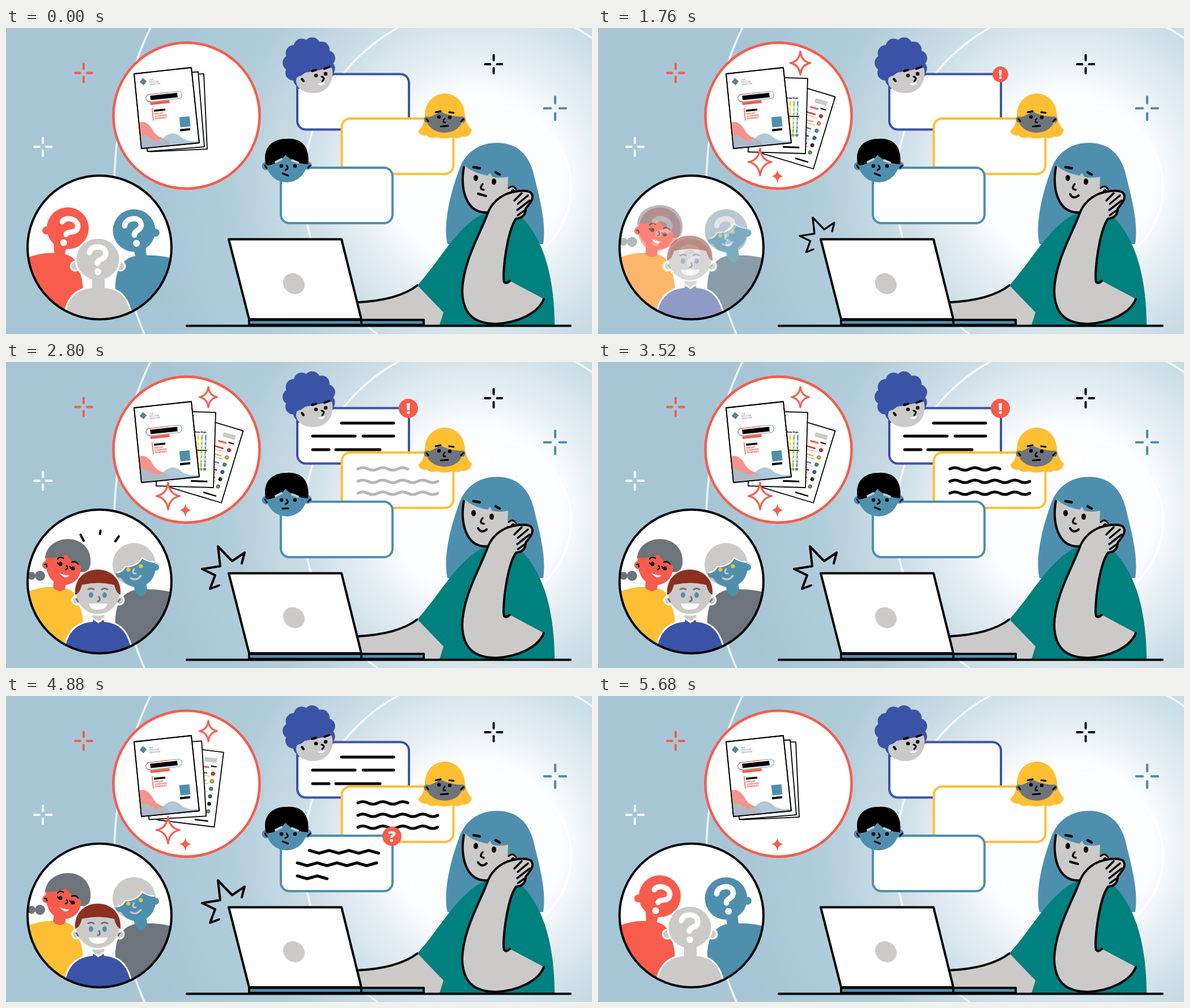
These frames come from a looping animation (1034 by 541 pixels, 5.76 s). An HTML page:

```html
<!DOCTYPE html>
<html lang="en">
<head>
<meta charset="utf-8">
<title>Documents and questions</title>
<style>
html, body { margin: 0; width: 100%; height: 100%; overflow: hidden; }
svg { display: block; width: 100vw; height: 100vh; --red: #f75c4c; --sea: #4f8fae; --navy: #3b53a6; --sun: #ffbf34; --skin: #cbcac9; --slate: #6d747c; }
.line { fill: none; stroke: #000; stroke-width: 4; stroke-linecap: round; stroke-linejoin: round; }
.thin { stroke-width: 3; }
.edge { stroke: #fff; stroke-width: 3; stroke-linejoin: round; }
.paper { fill: #fff; stroke: #000; stroke-width: 1.8; stroke-linejoin: round; }
.bubble { fill: #fff; stroke-width: 4; }
.red { fill: var(--red); } .sea { fill: var(--sea); } .navy { fill: var(--navy); }
.sun { fill: var(--sun); } .skin { fill: var(--skin); } .slate { fill: var(--slate); }
.outline { fill: #fff; stroke: var(--red); stroke-linejoin: round; }
.text { stroke-width: 5; }
.badge text { font: 800 27px "Open Sans", sans-serif; fill: #fff; text-anchor: middle; }
.tiny { font: 4px Inter, sans-serif; fill: #777; }
.tinyRed { font: 800 4px Inter, sans-serif; fill: var(--red); }
</style>
</head>
<body>
<svg viewBox="0 0 1034 541" preserveAspectRatio="none">
<defs>
  <radialGradient id="sky" gradientUnits="userSpaceOnUse" cx="830" cy="265" r="600">
    <stop offset="0" stop-color="#fff"/><stop offset=".25" stop-color="#fcfdfe"/>
    <stop offset=".36" stop-color="#e6eff3"/><stop offset=".49" stop-color="#cfe0e8"/>
    <stop offset=".72" stop-color="#b2cdda"/><stop offset="1" stop-color="#a6c6d6"/>
  </radialGradient>
  <clipPath id="crowdClip"><circle cx="165" cy="388" r="127"/></clipPath>
  <clipPath id="coverClip"><path d="M226,81L327,70 341,203 239,213Z"/></clipPath>
  <path id="plus" d="M0,-16V-7M0,7V16M-15,0H-6M6,0H15"/>
  <path id="star" d="M0,-18Q2,-2.5 15.5,0Q2,2.5 0,18Q-2,2.5 -15.5,0Q-2,-2.5 0,-18Z"/>
  <g id="query">
    <path d="M-15,-10C-13,-23 14,-24 14,-8C14,3 -1,1 -1,9" fill="none" stroke="#fff" stroke-width="9.5" stroke-linecap="round"/>
    <circle cy="24" r="6" fill="#fff"/>
  </g>
  <path id="bodyLeft" d="M30,410Q58,396 85,398L84,380H108L104,400Q120,403 126,420Q137,445 136,470L100,520H30Z"/>
  <path id="bodyRight" d="M193,470C191,430 203,408 228,403L224,385H246L248,402Q272,401 296,408V520H222Z"/>
  <path id="bodyFront" d="M101,520C104,478 122,461 152,458V440H174V458C203,461 219,478 224,520Z"/>
</defs>

<rect width="1034" height="541" fill="url(#sky)"/>
<g fill="none" stroke="#fff" stroke-width="3.5" opacity=".8">
  <circle cx="848" cy="282" r="657"/><circle cx="848" cy="282" r="323"/><circle cx="852" cy="282" r="145"/>
</g>
<g fill="none" stroke-width="4" stroke-linecap="round">
  <use href="#plus" x="137" y="79.5" stroke="#f75c4c"/>
  <use href="#plus" x="65" y="210" stroke="#fff"/>
  <use href="#plus" x="860.5" y="64" stroke="#000"/>
  <use href="#plus" transform="translate(969 142) scale(1.28)" stroke="#4f8fae" stroke-width="3.3"/>
</g>

<!-- documents -->
<circle cx="318.5" cy="155" r="129" fill="#fff" stroke="#f75c4c" stroke-width="4.5"/>
<g id="page3">
  <rect class="paper" x="-101" y="-133" width="101" height="133"/>
  <rect x="-32" y="-121" width="22" height="8" fill="#c9c9c9"/>
  <rect x="-37" y="-105" width="15" height="3" class="red"/><rect x="-19" y="-107" width="10" height="2"/>
  <g id="rows"></g>
  <rect x="-36" y="-10" width="24" height="2.5"/>
</g>
<g id="page2">
  <rect class="paper" x="-101" y="-133" width="101" height="133"/>
  <text class="tiny" x="-47" y="-96" style="font-weight:800;fill:#000">Good Data Stats</text>
  <g id="columns"></g>
  <path d="M-60,-65H-14" class="line" style="stroke-width:1.5"/>
  <rect x="-40" y="-12" width="29" height="3"/>
</g>
<path class="paper" d="M226,81L327,70 341,203 239,213Z"/>
<g clip-path="url(#coverClip)">
  <path d="M230,169Q246,160 257,177Q263,189 272,193Q286,197 293,210L235,218Z" fill="#f7938a"/>
  <path d="M230,194Q244,184 256,195Q268,203 278,194Q294,179 309,193Q322,204 345,198V215H235Z" fill="#a3bfd0" opacity=".85"/>
</g>
<path class="paper" d="M226,81L327,70 341,203 239,213Z" style="fill:none"/>
<g transform="translate(226 81) rotate(-6.2)">
  <rect x="10" y="11" width="9" height="9" fill="#597f9b" transform="rotate(45 14.5 15.5)"/>
  <text class="tiny" y="15"><tspan x="25">THE</tspan><tspan x="25" dy="4.2">ROUTINE</tspan><tspan x="25" dy="4.2">REGISTER</tspan></text>
  <rect x="16" y="39" width="64" height="13" rx="6.5" fill="#fff" stroke="#6f9db2"/>
  <path d="M58,39H23a6.5,6.5 0 0 0 0,13" fill="none" stroke="#f75c4c"/>
  <rect x="24" y="41.5" width="48" height="8"/>
  <rect x="23" y="53" width="34" height="5" class="red"/>
  <path d="M25,64V86" stroke="#f75c4c" stroke-width="1.5"/>
  <rect x="28" y="67" width="20" height="3.5"/>
  <text class="tinyRed" y="76"><tspan x="28">REPORT</tspan><tspan x="28" dy="4.2">OVERVIEW</tspan><tspan x="28" dy="4.2">SUMMARY</tspan></text>
  <rect x="71" y="85" width="18" height="18" class="sea"/>
  <rect x="70" y="106" width="18" height="4"/>
</g>
<g transform="translate(357 62)"><g id="star1"><use href="#star" class="outline" stroke-width="3"/></g></g>
<g transform="translate(286 237)"><g id="star2"><use href="#star" class="outline" transform="scale(1.32)" stroke-width="2.4"/></g></g>
<g transform="translate(316.5 262)"><g id="star3"><use href="#star" class="red" transform="scale(.66)"/></g></g>

<!-- crowd -->
<circle cx="165" cy="388" r="127" fill="#fff"/>
<g clip-path="url(#crowdClip)">
  <g id="unknown">
    <g class="red"><use href="#bodyLeft"/><circle cx="109" cy="354" r="37"/><circle cx="71" cy="358" r="7"/></g>
    <g class="sea"><use href="#bodyRight"/><circle cx="226" cy="358" r="37.5"/><circle cx="264" cy="362" r="7"/></g>
    <use href="#query" transform="translate(110 357) rotate(20)"/>
    <use href="#query" transform="translate(226 357) rotate(-10)"/>
    <g class="skin edge">
      <use href="#bodyFront"/><circle cx="122" cy="421" r="8"/><circle cx="202" cy="421" r="8"/>
      <ellipse cx="162" cy="409" rx="39" ry="38"/>
    </g>
    <path d="M152,438H174V460H152Z" class="skin"/>
    <use href="#query" transform="translate(162 407)"/>
  </g>
  <g id="known">
    <g class="slate"><circle cx="45" cy="378" r="7"/><circle cx="60" cy="378" r="9"/></g>
    <use href="#bodyLeft" class="sun"/>
    <path class="red" d="M85,380H108L104,402Q94,409 83,399Z"/>
    <path class="slate" d="M69,347C70,325 90,313 109,313C135,313 152,332 149,358C147,372 135,373 128,370Z"/>
    <path class="red" d="M70,346Q95,347 106,340Q114,353 132,361C134,380 120,395 101,394C80,394 68,372 70,346Z"/>
    <circle cx="71" cy="359" r="7" class="red"/>
    <path class="line" style="stroke-width:2.5" d="M68,358Q72,356 72,362M91,348Q96,343 101,347M116,354Q123,351 127,357M91,355L95,359M113,362L117,367M107,360Q111,366 105,367"/>
    <circle cx="96" cy="357" r="3.5"/><circle cx="118" cy="365" r="3.5"/>
    <path d="M94,373Q104,378 112,377Q105,386 94,373Z" fill="#fff"/>

    <use href="#bodyRight" class="slate"/>
    <path d="M224,385H247L249,403Q240,425 227,404Z" class="sea"/>
    <circle cx="226" cy="358" r="38" class="skin"/>
    <path class="sea" d="M193,374Q205,374 210,362Q232,362 240,346Q252,350 263,354C268,380 250,398 232,398C214,398 207,387 203,382Q196,383 193,374Z"/>
    <path class="line" style="stroke:#fff;stroke-width:2.5" d="M197,372Q206,371 210,362Q232,362 240,346Q248,352 261,354"/>
    <circle cx="264" cy="363" r="6" class="sea"/>
    <circle cx="216" cy="367" r="3.5" class="sun"/><circle cx="238" cy="361" r="3.5" class="sun"/>
    <path class="line thin" style="stroke:#cbcac9" d="M226,366Q221,374 229,374M220,382Q230,388 238,378"/>

    <g class="edge">
      <use href="#bodyFront" class="navy"/>
      <path class="skin" d="M151,440H175V452L163,460 151,452Z"/>
      <circle cx="125" cy="421" r="8" class="skin"/><circle cx="200" cy="421" r="8" class="skin"/>
      <ellipse cx="162" cy="407" rx="40" ry="40" class="skin"/>
    </g>
    <path d="M122,412C117,352 207,352 202,412Q194,408 191,394Q162,387 134,394Q131,408 122,412Z" fill="#8c3021"/>
    <g class="sea"><ellipse cx="150" cy="412" rx="4" ry="5"/><ellipse cx="174" cy="412" rx="4" ry="5"/></g>
    <path class="line thin" style="stroke:#6d747c" d="M145,402Q150,399 155,402M169,402Q174,399 179,402M164,415Q168,422 162,423M124,419L127,424M201,419L198,424"/>
    <path d="M146,427H179Q177,438 162,438Q148,438 146,427Z" fill="#fff"/>
  </g>
</g>
<circle cx="165" cy="388" r="127" class="line"/>
<g id="rays" class="line">
  <path pathLength="1" d="M137,316L121,284"/><path pathLength="1" d="M166,304L168,286"/><path pathLength="1" d="M193,317L211,291"/>
</g>

<!-- messages -->
<rect class="bubble" x="514" y="81.5" width="197" height="98" rx="15" stroke="#3b53a6"/>
<path id="text1" class="line text" d="M592,108H684M541,131H616M630,131H684M541,155H570M582,155H660"/>
<rect class="bubble" x="592.5" y="160" width="197" height="98" rx="15" stroke="#ffbf34"/>
<path id="text2" class="line text"/>
<rect class="bubble" x="485" y="247" width="197" height="98" rx="15" stroke="#4f8fae"/>
<path id="text3" class="line text"/>

<g class="navy"><g id="curls"></g><circle cx="536" cy="60" r="35"/><path d="M500,70L515,108 545,100 578,84 574,60Z"/></g>
<path class="skin" d="M528,79Q550,75 575,70C581,95 566,115 543,115C525,115 511,106 512,92Q520,84 528,79Z"/>
<circle cx="519" cy="92" r="7" class="skin"/>
<g class="line"><path d="M522,90L525,94M540,76L547,74M562,72L570,69"/><path class="thin" d="M557,86Q564,88 558,94"/></g>
<circle cx="547" cy="84" r="3.3"/><circle cx="564" cy="81" r="3.3"/>
<path d="M549,98Q556,99 563,95Q560,105 549,98Z" fill="#fff"/>

<path class="sun" d="M739,155C740,103 808,103 810,155C812,168 817,175 822,180Q819,194 805,192Q796,197 788,193Q774,198 760,193Q750,197 742,190Q732,192 727,182C736,175 738,165 739,155Z"/>
<path class="slate" d="M741,159Q757,155 766,147Q780,156 806,157C806,174 792,185 774,185C756,185 742,174 741,159Z"/>
<g class="slate"><circle cx="743" cy="162" r="5.5"/><circle cx="805" cy="162" r="5.5"/></g>
<g class="line thin"><path d="M758,149L767,147M782,149L790,150M742,161L745,165M807,161L803,165M774,160Q769,167 775,167M767,174L780,173"/></g>
<circle cx="764" cy="157" r="3.2"/><circle cx="783" cy="158" r="3.2"/>

<g class="sea"><circle cx="495" cy="237" r="36"/><circle cx="459" cy="244" r="7.5"/><circle cx="532" cy="243" r="7.5"/></g>
<path d="M458,240C452,208 474,195 496,196C520,194 537,209 533,241Q508,240 493,224Q483,240 461,243Z"/>
<path class="line" d="M476,237L486,232M505,234L515,238" style="stroke:#cbcac9"/>
<circle cx="486" cy="244" r="3.3"/><circle cx="510" cy="244" r="3.3"/>
<path class="line thin" d="M457,243L460,248M537,243L533,247M495,243Q500,249 493,251"/>
<g transform="translate(493 259)"><path id="boyMouth" class="line thin" d="M-5,-2L5,2"/></g>

<g class="badge">
  <g transform="translate(710 82)"><g id="alert"><circle r="17" class="red"/><text y="10">!</text></g></g>
  <g transform="translate(681 248)"><g id="ask"><circle r="17" class="red"/><text y="10">?</text></g></g>
</g>

<!-- woman -->
<path class="sea" d="M779,382C771,350 783,295 798,255C808,220 835,203 866,203C905,203 925,228 932,262C944,310 953,345 948,382Z"/>
<path class="skin" d="M620,485C660,483 700,475 726,455L775,503 765,524H737V515H627Z"/>
<path class="line" d="M620,485C660,483 700,475 726,455"/>
<path fill="#00807f" d="M848,326C800,345 770,405 726,455L772,503 765,525H968C968,450 952,372 905,330Z"/>
<path class="skin" d="M809,243C800,275 806,326 848,326C870,322 882,308 885,290L886,263Q870,266 858,263L854,256 850,261Q825,257 809,243Z"/>
<path class="line" d="M808,246C801,280 810,328 849,326"/>
<circle cx="893" cy="287" r="8" class="skin"/><path class="line thin" d="M887,283Q894,276 900,285M892,290Q893,285 897,288"/>
<path class="line" style="fill:var(--skin)" d="M949,479C940,503 905,521 865,523C825,523 806,505 805,465C806,415 836,365 849,330C856,310 870,299 884,293C900,288 915,286 925,290C932,296 930,305 917,319C917,329 912,336 900,337C884,360 875,435 879,449Q883,453 889,447"/>
<path class="line" style="stroke-width:3.5" d="M897,305L910,292M903,311L921,296M902,322L924,305M903,331L916,322"/>
<path id="brows" class="line" style="stroke-width:4.5" d="M825,246L836,248M864,255L871,259"/>
<g id="gaze">
  <g transform="translate(829 265)"><ellipse class="lid" rx="4" ry="5.5"/></g>
  <g transform="translate(861 271.5)"><ellipse class="lid" rx="4" ry="5.5"/></g>
</g>
<path class="line" style="stroke-width:3.5" d="M841,276Q834,285 843,286"/>
<path id="flat" class="line" d="M833,293L847,297"/>
<path id="smile" class="line" d="M833,294Q839,304 848,296"/>

<!-- laptop -->
<g transform="translate(400 375)"><g id="burst"><path class="line" transform="translate(-400 -375)" d="M416,356L421,337 399,352 374,326 378,361 346,366 369,377 360,401 376,395"/></g></g>
<path class="line" style="fill:var(--sea)" d="M429,516H737V525H429ZM627,516V525"/>
<path class="line" style="fill:#fff" d="M393,373.5H592L627,515H429Z"/>
<ellipse cx="508" cy="452" rx="20" ry="17.5" transform="rotate(40 508 452)" class="skin"/>
<path class="line" d="M319,526.5H996"/>
</svg>

<script>
const LOOP = 5760, STEP = 80;
const $ = id => document.getElementById(id);
const repeat = (n, draw) => Array.from({ length: n }, (_, i) => draw(i)).join('');

// repeated details
const squiggle = (x, y, n) => `M${x},${y}q8.8,-4.5 17.6,0` + 't17.6,0'.repeat(n - 1);
const zigzag = (x, y, n) => `M${x},${y}` + repeat(n, i => `l17.5,${i % 2 ? -5 : 5}`);
$('text2').setAttribute('d', squiggle(621, 189, 5) + squiggle(621, 211, 8) + squiggle(621, 232, 8));
$('text3').setAttribute('d', zigzag(535, 273, 7) + zigzag(514, 295, 8) + zigzag(514, 318, 3));
$('curls').innerHTML = repeat(11, i => {
  const a = i * Math.PI * 2 / 11 + .3;
  return `<circle cx="${535 + 33 * Math.cos(a)}" cy="${62 + 32 * Math.sin(a)}" r="14"/>`;
});
const inks = ['#c8382c', '#f0a92c', '#3b8aa8', '#3b53a6', '#222', '#5a9a55'];
$('rows').innerHTML = repeat(inks.length, i => `<g transform="translate(0 ${13.4 * i - 93})">
  <path d="M-44,0H-24" stroke="${inks[i]}" stroke-width="2.5"/><path d="M-40,5H-20" stroke="#aaa"/>
  <circle cx="-14" r="3.2" fill="${inks[i]}" stroke="#333" stroke-width=".7"/></g>`);
const bars = ['#c9c9c9', '#f2c230', '#9db83c', '#4f8fae'];
$('columns').innerHTML = repeat(bars.length, i => `<g transform="translate(${6.6 * i - 36} 0)">
  <path d="M0,-92V-36" stroke="${bars[i]}" stroke-width="2.5"/>
  <path d="M0,-84V-42" stroke="#fff" stroke-width="1.2" stroke-dasharray="5 3"/><circle cy="-32" r="2.8" fill="${bars[i]}"/></g>`);

// motion rules
const clamp = v => Math.min(1, Math.max(0, v));
const mix = (a, b, k) => a + (b - a) * k;
const overshoot = p => 1 + 2.7 * (p - 1) ** 3 + 1.7 * (p - 1) ** 2;
const setScale = (id, s) => $(id).setAttribute('transform', `scale(${Math.max(0, s)})`);
const placePage = (id, from, to, k) => {
  const [x, y, angle] = from.map((v, i) => mix(v, to[i], k));
  $(id).setAttribute('transform', `translate(${x} ${y}) rotate(${angle})`);
};

function draw(t) {
  const ramp = (start, length) => clamp((t - start) / length);
  const between = (start, end, rise, fall = rise) => ramp(start, rise) - ramp(end, fall);
  const pop = (start, end) => overshoot(ramp(start, 320)) * (1 - ramp(end, 240));
  const pulse = (...peaks) => 1 + .2 * Math.max(...peaks.map(p => 1 - Math.abs(t - p) / 240), 0);
  const fade = (id, amount) => $(id).setAttribute('opacity', amount);

  placePage('page2', [350, 210, -4.7], [366, 222, 1.7], between(480, 4560, 560, 400));
  placePage('page3', [355, 214, -2.6], [380, 249, 16.8], between(800, 4640, 640, 480));
  setScale('star1', pop(640, 5040) * pulse(1840, 3200, 3760));
  setScale('star2', pop(1120, 5440));
  setScale('star3', pop(1120, 5680));

  const reveal = between(1600, 5200, 320);
  fade('known', reveal);
  fade('unknown', 1 - reveal);
  // each ray shoots outward, then its tail catches up
  const since = t - [2000, 2720, 4000].findLast(start => start <= t);
  const head = clamp(since / 240), tail = clamp((since - 160) / 100);
  $('rays').setAttribute('stroke-dasharray', `${head - tail} 3`);
  $('rays').setAttribute('stroke-dashoffset', -tail);
  fade('rays', head > tail ? 1 : 0);

  fade('text1', between(2080, 5040, 480, 240));
  fade('text2', between(2640, 5040, 560, 240));
  fade('text3', between(4080, 5040, 360, 240));
  setScale('alert', pop(1680, 4640));
  setScale('ask', pop(3600, 4960));
  setScale('burst', pop(1680, 5040) * pulse(3200, 3840, 4480));
  $('boyMouth').setAttribute('transform', `rotate(${-24 * between(2560, 2960, STEP)})`);

  const happy = t >= 800 && t < 5520;
  fade('smile', happy ? 1 : 0);
  fade('flat', happy ? 0 : 1);
  const look = between(1760, 3520, 240), down = between(2400, 3520, 240);
  $('gaze').setAttribute('transform', `translate(${-3 * look - down} ${2 * down})`);
  const blink = (t + 640) % 1920 < 2 * STEP;
  document.querySelectorAll('.lid').forEach(lid => lid.setAttribute('transform', `scale(1 ${blink ? .2 : 1})`));
  $('brows').setAttribute('transform', `translate(0 ${blink ? 2 : 0})`);
}

function tick(now) {
  draw(Math.floor(now % LOOP / STEP) * STEP);
  requestAnimationFrame(tick);
}
draw(0);
requestAnimationFrame(tick);
</script>
</body>
</html>
```
